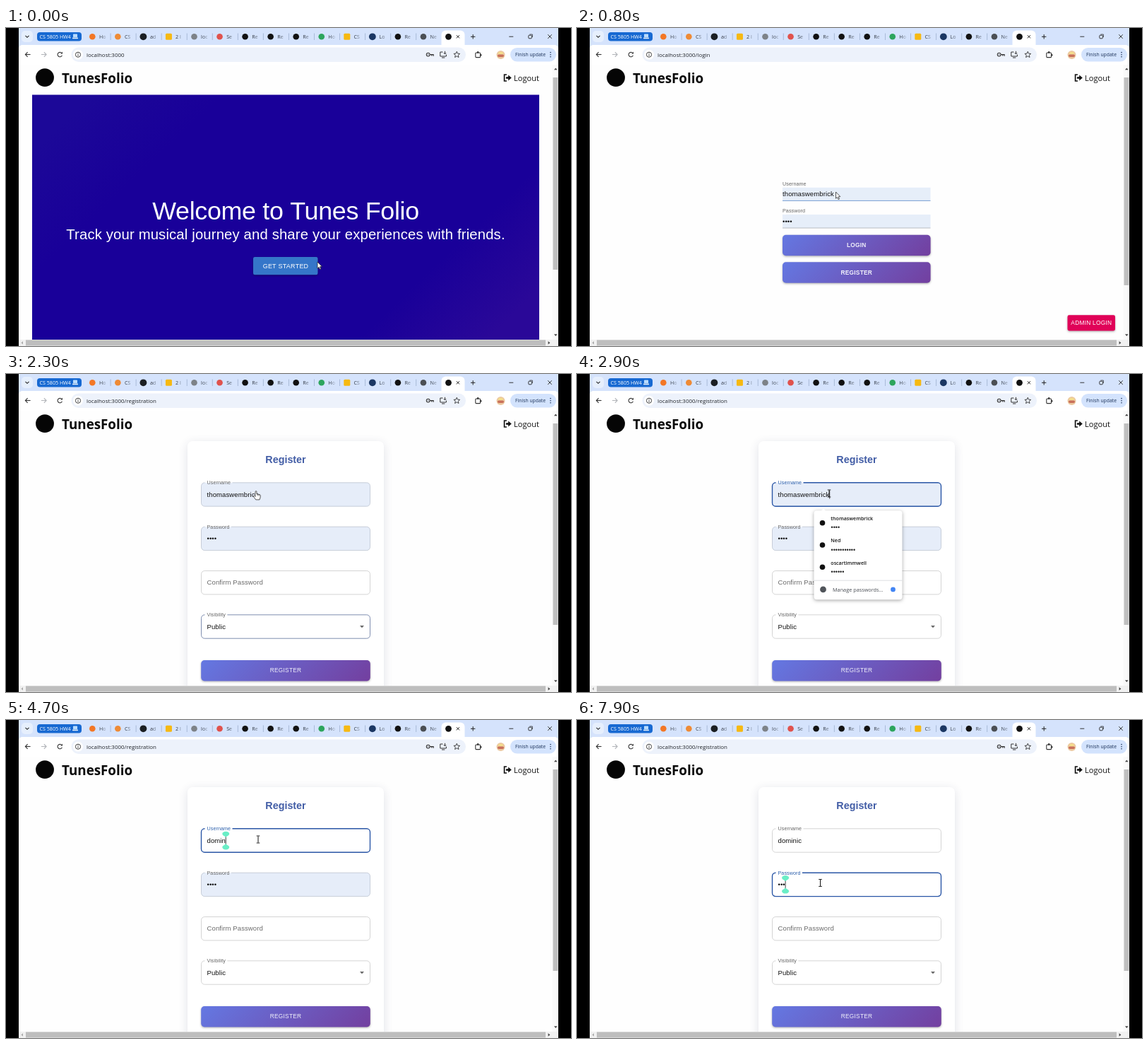
An HTML page with a canvas for the animation above (8000 ms loop, 800 by 450 pixels).

```html
<!DOCTYPE html>
<html lang="en">
<head>
<meta charset="utf-8">
<title>TunesFolio</title>
<style>
html, body { margin: 0; width: 100%; height: 100%; overflow: hidden; background: #000; }
canvas { display: block; width: 800px; height: 450px; }
</style>
</head>
<body>
<canvas id="stage"></canvas>
<script>
const LOOP = 8000, STEP = 100;
const ARIAL = '"Liberation Sans", Arial, sans-serif';
const UI = '"Open Sans", "Noto Sans", sans-serif';
const BRAND = ['Tunes', 'Folio'];
const USER = 'thomaswembrick', NEW_USER = 'dominic';
const SAVED = [[USER, 4], ['Ned', 11], ['oscartimmwell', 6]];

const canvas = document.getElementById('stage');
const dpr = window.devicePixelRatio || 1;
canvas.width = 800 * dpr;
canvas.height = 450 * dpr;
const c = canvas.getContext('2d');

// ---- drawing helpers ----
function rect(x, y, w, h, fill, r = 0) {
  c.fillStyle = fill;
  c.beginPath();
  c.roundRect(x, y, w, h, r);
  c.fill();
}
function frame(x, y, w, h, color, lw, r) {
  c.strokeStyle = color;
  c.lineWidth = lw;
  c.beginPath();
  c.roundRect(x, y, w, h, r);
  c.stroke();
}
function disc(x, y, r, fill) {
  c.fillStyle = fill;
  c.beginPath();
  c.arc(x, y, r, 0, 7);
  c.fill();
}
function ring(x, y, r, color, lw = 1, a = 0, b = Math.PI * 2) {
  c.strokeStyle = color;
  c.lineWidth = lw;
  c.beginPath();
  c.arc(x, y, r, a, b);
  c.stroke();
}
function trace(pts, closed) {
  c.beginPath();
  for (let i = 0; i < pts.length; i += 2) c.lineTo(pts[i], pts[i + 1]);
  if (closed) c.closePath();
}
function line(pts, color, lw = 1) {
  trace(pts);
  c.strokeStyle = color;
  c.lineWidth = lw;
  c.stroke();
}
function poly(pts, fill) {
  trace(pts, true);
  c.fillStyle = fill;
  c.fill();
}
function text(s, x, y, size, color, o = {}) {
  c.font = `${o.weight || 400} ${size}px ${o.font || ARIAL}`;
  c.letterSpacing = (o.space || 0) * size + 'px';
  c.textAlign = o.align || 'left';
  c.fillStyle = color;
  c.fillText(s, x, y);
  return c.measureText(s).width;
}
const ui = (s, x, y, size, color, weight) => text(s, x, y, size, color, { font: UI, weight });
const input = (s, x, y, color = '#111') => text(s, x, y, 9.56, color, { space: .0094 });
const dots = n => '•'.repeat(n);
function shadow(color, blur, dy) {
  c.shadowColor = color;
  c.shadowBlur = blur * dpr;
  c.shadowOffsetY = dy * dpr;
}
const noShadow = () => shadow('transparent', 0, 0);

// ---- browser ----
const TABS = [
  ['#f37726', 'Ho'], ['#ee8a35', 'CS'], ['#1b1f23', 'ad'], ['#f6b912', '2 l', 1], ['#7d8288', 'loc'],
  ['#e0524d', 'Se'], ['#111', 'Re'], ['#111', 'Re'], ['#111', 'Re'], ['#2da55d', 'Ho'],
  ['#f6b912', 'CS', 1], ['#1b3763', 'Lo'], ['#111', 'Re'], ['#4b4f54', 'Ne']
];

function tabStrip() {
  rect(18, 0, 764, 32, '#d5e3fc');
  rect(22, 4, 16, 16, '#e6effd', 5);
  line([27.5, 10.8, 30, 13.3, 32.5, 10.8], '#222', 1.1);
  rect(44, 6, 63, 12.5, '#1769d2', 4);
  ui('CS 5805 HW4', 47.5, 15, 7.15, '#fff');
  rect(95, 8.5, 6, 4.5, '#b9dcff', .6);
  rect(94, 13.6, 8, 1.6, '#e4eef8', .6);
  TABS.forEach(([color, label, square], i) => {
    const x = 122.3 + i * 36.05;
    if (square) rect(x - 4.5, 7.8, 9, 9, color, 1.5);
    else disc(x, 12.3, i === 2 || i === 11 ? 4.9 : 4.3, color);
    const fade = c.createLinearGradient(x + 9, 0, x + 20, 0);
    fade.addColorStop(.35, '#333b47');
    fade.addColorStop(1, 'rgba(51,59,71,.1)');
    c.save();
    c.beginPath();
    c.rect(x + 9, 2, 10.5, 20);
    c.clip();
    ui(label, x + 9.6, 15, 7.2, fade);
    c.restore();
    if (i < 13) line([x + 25.8, 7.5, x + 25.8, 17], '#9db0cf', .8);
  });
  rect(616.5, 3.5, 33, 24, '#fff', [6, 6, 0, 0]);
  disc(626.5, 12.3, 4.4, '#111');
  line([637.8, 10.2, 642, 14.4], '#222');
  line([642, 10.2, 637.8, 14.4], '#222');
  line([658, 12.3, 664.4, 12.3], '#222');
  line([661.2, 9.1, 661.2, 15.5], '#222');
  line([712.3, 12.2, 718.3, 12.2], '#222', .9);
  frame(739.8, 10.2, 4.6, 4.6, '#222', .9, 1);
  line([741.4, 9, 745.4, 9, 745.4, 13], '#222', .7);
  line([767.2, 9.3, 772.8, 14.9], '#222', .9);
  line([772.8, 9.3, 767.2, 14.9], '#222', .9);
}

function arrowIcon(x, dir, color) {
  line([x - 3.6, 37.5, x + 3.6, 37.5], color, 1.1);
  line([x - dir * .4 + dir * .8, 34.2, x + dir * 3.6, 37.5, x + dir * .4, 40.8], color, 1.1);
}

function star(x, y, r) {
  const pts = [];
  for (let i = 0; i < 10; i++) {
    const a = i * Math.PI / 5 - Math.PI / 2, k = i % 2 ? r * .45 : r;
    pts.push(x + k * Math.cos(a), y + k * Math.sin(a));
  }
  trace(pts, true);
  c.strokeStyle = '#333';
  c.lineWidth = .9;
  c.stroke();
}

function toolbar(path) {
  rect(18, 24, 764, 28, '#fff', [5, 5, 0, 0]);
  arrowIcon(31, -1, '#333');
  arrowIcon(53.5, 1, '#b3b6ba');
  ring(76.3, 37.6, 3.2, '#333', 1.1, .3, 5.4);
  poly([77.2, 36.6, 80, 36.6, 80, 33.6], '#333');
  rect(92.5, 27.5, 558.5, 20.5, '#edf2fb', 10.2);
  disc(102, 37.7, 7, '#fff');
  ring(102, 37.7, 3.6, '#333', .9);
  line([102, 37.3, 102, 39.8], '#333', .9);
  disc(102, 35.9, .55, '#333');
  const w = ui('localhost:3000', 114, 40.6, 7.95, '#20242a');
  ui(path, 114 + w, 40.6, 7.95, '#20242a');
  ring(597.7, 37.6, 2.4, '#333', 1.1);
  disc(597.7, 37.6, .7, '#333');
  line([600.2, 37.6, 605.2, 37.6, 605.2, 39.8], '#333', 1.1);
  line([602.8, 37.6, 602.8, 39.6], '#333', 1.1);
  line([618.5, 34, 614.8, 34, 614.8, 40, 623.4, 40, 623.4, 37.5], '#333');
  line([617, 42, 621.3, 42], '#333');
  line([621.5, 32.8, 621.5, 36.6], '#333');
  line([619.8, 35.3, 621.5, 37, 623.2, 35.3], '#333');
  star(638.3, 37.8, 4.6);
  frame(664.8, 35, 6.8, 6.6, '#333', 1.1, 1);
  disc(668.2, 34.4, 1.3, '#333');
  disc(672.2, 38.2, 1.3, '#333');
  disc(700.5, 38, 6, '#ecc9a0');
  rect(696, 37.4, 9, 3.6, '#c9705a', 1.8);
  rect(697.2, 34, 6.6, 3, '#f4dd8b', 1.5);
  rect(714, 28, 65, 19.5, '#d3e3fd', 9.7);
  ui('Finish update', 721, 40.4, 6.83, '#1b3157');
  [34.6, 37.7, 40.8].forEach(y => disc(771, y, .8, '#1b3157'));
}

function scrollbars(thumbEnd) {
  rect(773.5, 52, 8.5, 389, '#f9f9f9');
  rect(774.5, 70, 7, thumbEnd - 70, '#bfbfbf');
  poly([776, 59.2, 780.6, 59.2, 778.3, 56.4], '#444');
  poly([776, 433.2, 780.6, 433.2, 778.3, 436], '#444');
  rect(18, 441, 764, 9, '#f1f1f1');
  rect(28, 441.5, 736, 8, '#bebebe');
  poly([24, 443.2, 24, 447.8, 21.4, 445.5], '#aaa');
  poly([767.6, 443.2, 767.6, 447.8, 770.4, 445.5], '#444');
}

function siteHeader() {
  rect(18, 52, 764, 398, '#fefefe');
  disc(55, 70.2, 12.9, '#050505');
  ui(BRAND.join(''), 79, 77.6, 18.8, '#0a0a0a', 700);
  line([709, 66, 705.6, 66, 705.6, 75, 709, 75], '#111', 1.7);
  line([708, 70.5, 712.5, 70.5], '#111', 2.6);
  poly([711.2, 66.4, 715.8, 70.5, 711.2, 74.6], '#111');
  ui('Logout', 719, 74.9, 11.1, '#111');
}

// ---- pages ----
function home() {
  const g = c.createLinearGradient(180, 40, 620, 500);
  g.addColorStop(0, '#1c0898');
  g.addColorStop(.2, '#190099');
  g.addColorStop(.8, '#190099');
  g.addColorStop(1, '#2a0898');
  rect(37, 94.5, 718, 347, g);
  text('Welcome to ' + BRAND.join(' '), 396, 271, 35.85, '#fff', { align: 'center', space: -.00833 });
  text('Track your musical journey and share your experiences with friends.', 396, 299.3, 20.3, '#fff',
    { align: 'center', space: .00735 });
  shadow('rgba(0,0,0,.35)', 3, 1);
  rect(350, 324, 91.5, 25.3, '#3576c9', 2.4);
  noShadow();
  text('GET STARTED', 396, 339.8, 8.96, '#fff', { align: 'center', space: .0286 });
}

function gradButton(label, x, y, w, weight) {
  const cx = x + w / 2, cy = y + 14.7, k = (w + 29.4) / 4;
  const g = c.createLinearGradient(cx - k, cy - k, cx + k, cy + k);
  g.addColorStop(0, '#6478e2');
  g.addColorStop(1, '#733f9f');
  shadow('rgba(0,0,0,.3)', 3, 1.2);
  rect(x, y, w, 29.4, g, 4.8);
  noShadow();
  text(label, cx, y + 17.3, 8.37, '#f0effa', { align: 'center', space: .0286, weight });
}

const label = (s, x, y, color = '#666') => text(s, x, y, 7.17, color, { space: .0094 });

function login(t) {
  label('Username', 291, 223);
  rect(291, 225.8, 209.5, 18.6, '#e6eef9');
  line([291, 244.4, 500.5, 244.4], t < 1100 ? '#6a94cf' : '#9a9ea6', .9);
  input(USER, 291, 238.3);
  label('Password', 291, 261.4);
  rect(291, 264, 209.5, 18.8, '#e6eef9');
  line([291, 283, 500.5, 283], '#9a9ea6', .7);
  input(dots(4), 291, 276.6);
  gradButton('LOGIN', 291, 292.8, 209.6, 700);
  gradButton('REGISTER', 291, 331.3, 209.6, 700);
  shadow('rgba(0,0,0,.3)', 3, 1.2);
  rect(694.5, 406.3, 67.5, 22.2, '#e00258', 2.4);
  noShadow();
  text('ADMIN LOGIN', 728.3, 420.4, 8.37, '#fff', { align: 'center', space: .0286 });
}

function field(name, y, o = {}) {
  rect(276.5, y, 239, 33.4, o.filled ? '#e6edf9' : '#fff', 4.8);
  const color = o.focus ? '#2a56a6' : o.hover ? '#5f719c' : o.filled ? '#bcc3d0' : '#c9c9c9';
  c.save();
  if (name) {
    c.font = '7.17px ' + ARIAL;
    c.letterSpacing = '.067px';
    const w = c.measureText(name).width;
    c.beginPath();
    c.rect(270, y - 5, 250, 45);
    c.rect(281.5, y - 3, w + 5.5, 6);
    c.clip('evenodd');
  }
  frame(276.5, y, 239, 33.4, color, o.focus ? 1.4 : .8, 4.8);
  c.restore();
  if (name) label(name, 284.5, y + 2.3, o.focus ? '#2f62ad' : '#666');
}

// Mint markers above and below the text cursor
function caret(x, y, marks) {
  line([x, y - 6, x, y + 6], '#111', .8);
  if (!marks) return;
  c.fillStyle = '#6aeec6';
  for (const d of [-1, 1]) {
    const cy = y + d * 9.5;
    c.beginPath();
    c.ellipse(x, cy, 5, 3.3, 0, 0, 7);
    c.fill();
    poly([x - 3.6, cy - d * 1.5, x + 3.6, cy - d * 1.5, x, cy - d * 5], '#6aeec6');
  }
}

function savedLogins(y) {
  shadow('rgba(0,0,0,.35)', 5, 1.2);
  rect(335.5, y, 125, 126, '#fff', 4);
  noShadow();
  poly([345.5, y + .5, 349, y - 2.6, 352.5, y + .5], '#fff');
  SAVED.forEach(([name, n], i) => {
    const ry = y + i * 31.2;
    disc(347.5, ry + 17.6, 3.8, '#111');
    ui(name, 359.3, ry + 14, 7.1, '#161616', 600);
    text(dots(n), 359.5, ry + 27.2, 9, '#222');
  });
  line([335.5, y + 99, 460.5, y + 99], '#d5d8dc', .8);
  disc(348.5, y + 111.7, 4.4, '#50545a');
  ui('Manage passwords...', 362, y + 114.3, 7.3, '#4a4e55');
  disc(447.5, y + 111.7, 3.4, '#4285f4');
}

const FOCUS_USER = 2700, SELECT = 3200, FOCUS_PASS = 5900, ERASE = 7200;
const KEYS = [4000, 4200, 4350, 4500, 4650, 4900, 5100];
const BACK = 7800;

function registration(t) {
  shadow('rgba(40,50,90,.14)', 14, 3);
  rect(257, 95, 278, 380, '#fff', 7);
  noShadow();
  text('Register', 396, 126.3, 14.34, '#425da6', { align: 'center', weight: 700 });

  const typed = KEYS.filter(k => t >= k).length;
  const onUser = t >= FOCUS_USER && t < FOCUS_PASS, onPass = t >= FOCUS_PASS;
  const erased = t >= BACK;
  const userHover = t >= 2400 && t < FOCUS_USER;
  field('Username', 153.8, { filled: !typed, focus: onUser, hover: userHover });
  const selected = t >= SELECT && !typed;
  if (selected) {
    const g = c.createLinearGradient(284, 165, 358, 177);
    g.addColorStop(0, '#2c66c6');
    g.addColorStop(1, '#5a48b8');
    rect(284.5, 165, 73, 11.6, g);
  }
  const value = typed ? NEW_USER.slice(0, typed) : USER;
  const w = input(value, 284.5, 174, selected ? '#fff' : '#111');
  if (onUser && !selected) caret(284.5 + w + .3, 170.6, typed > 0);

  field('Password', 216.2, { filled: !erased, focus: onPass });
  const pw = input(dots(erased ? 3 : 4), 284.5, 236.4);
  if (onPass && (erased || (t - FOCUS_PASS) % 1060 < 530)) caret(284.5 + pw + .3, 232.8, erased);

  field('', 278.5);
  input('Confirm Password', 284.5, 298.2, '#6b6b6b');
  field('Visibility', 340.8, { hover: t < 2400 });
  input('Public', 284.5, 360.7);
  poly([501, 356, 507, 356, 504, 359.2], '#666');
  gradButton('REGISTER', 276.2, 405, 239.6);

  if (t >= FOCUS_USER && !typed) savedLogins(193.2);
  if (onPass && t < ERASE) savedLogins(255.6);
}

// ---- pointer ----
const PATH = [
  [0, 441, 331], [300, 408, 335], [400, 408, 335], [800, 366.5, 232], [1000, 366.5, 232],
  [1500, 394, 346], [2000, 394, 346], [2300, 354, 165.5], [2400, 357, 169],
  [5300, 357, 169], [5700, 344.5, 230.5], [LOOP, 344.5, 230.5]
];

function pointerAt(t) {
  const i = PATH.findIndex(p => p[0] > t);
  const [t0, x0, y0] = PATH[i - 1], [t1, x1, y1] = PATH[i];
  const u = (t - t0) / (t1 - t0), e = u * u * (3 - 2 * u);
  return [x0 + (x1 - x0) * e, y0 + (y1 - y0) * e];
}

function outlined(pts) {
  trace(pts, true);
  c.fillStyle = '#fff';
  c.fill();
  c.strokeStyle = '#222';
  c.lineWidth = .75;
  c.lineJoin = 'round';
  c.stroke();
}

function pointer(t) {
  const [x, y] = pointerAt(t);
  c.save();
  c.translate(x, y);
  if (t >= 2400) {
    line([0, -4.5, 0, 4.5], '#111');
    for (const s of [-5, 5]) line([-2.3, s, 2.3, s], '#111', .9);
  } else if ((t >= 200 && t < 400) || t >= 1400) {
    outlined([-1, .8, 0, 0, 1, .8, 1, 4.4, 5.6, 5.2, 6.3, 6.4, 6, 9.5, 5, 12.4, -.3, 12.4,
      -3.6, 7.8, -3.3, 6.6, -2.3, 6.6, -1, 8]);
    line([2.6, 5, 2.6, 7], '#222', .6);
    line([4.4, 5.3, 4.4, 7], '#222', .6);
  } else {
    outlined([0, 0, 0, 9.2, 2.1, 7.4, 3.5, 10.6, 5, 9.9, 3.6, 6.8, 6.3, 6.6]);
  }
  c.restore();
}

function draw(t) {
  c.setTransform(dpr, 0, 0, dpr, 0, 0);
  rect(0, 0, 800, 450, '#000');
  const page = t < 400 ? 0 : t < 1700 ? 1 : 2;
  c.save();
  c.beginPath();
  c.rect(18, 0, 764, 450);
  c.clip();
  siteHeader();
  [home, login, registration][page](t);
  scrollbars([342, 364, 355][page]);
  tabStrip();
  toolbar(['', '/login', '/registration'][page]);
  pointer(t);
  c.restore();
}

const start = performance.now();
function tick(now) {
  const t = Math.max(0, now - start) % LOOP;
  draw(Math.floor(t / STEP) * STEP);
  requestAnimationFrame(tick);
}
draw(0);
requestAnimationFrame(tick);
</script>
</body>
</html>
```
